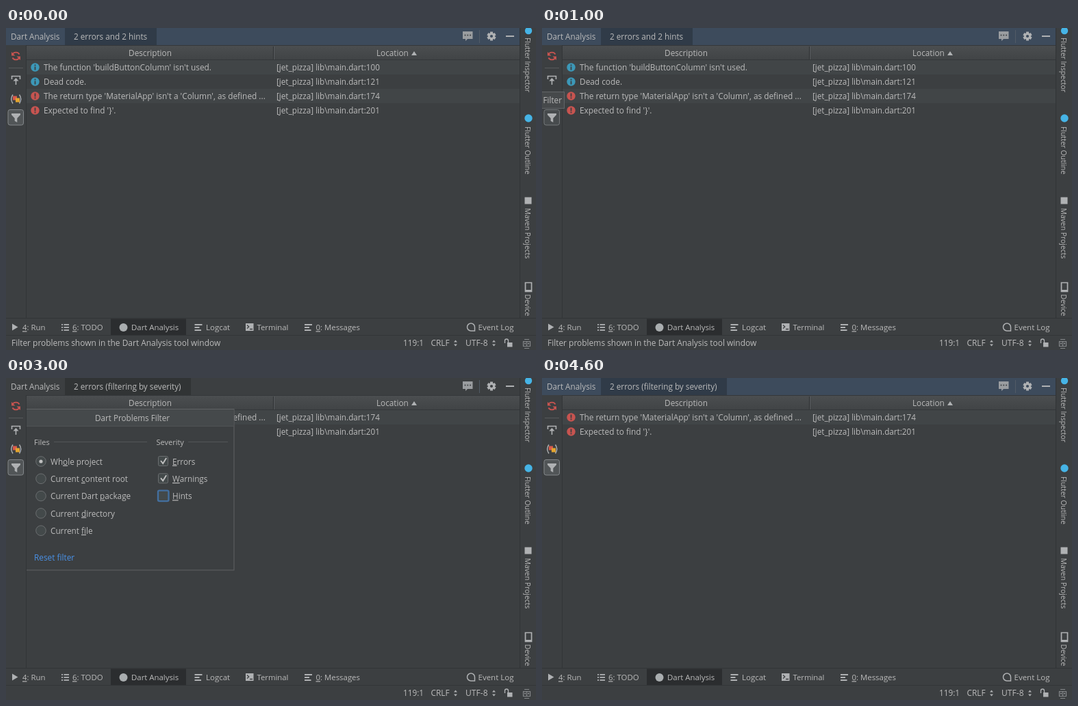
Animation of 774x471 px, one loop 5 s. Source, as an HTML page:

```html
<!DOCTYPE html>
<html lang="en">
<head>
<meta charset="utf-8">
<title>Analysis filter</title>
<style>
html, body { margin: 0; width: 100%; height: 100%; overflow: hidden; background: #3c3f41; }
svg { display: block; }
text { font-family: "Open Sans", "Noto Sans", sans-serif; fill: #bbbbbb; white-space: pre; }
.u { text-decoration: underline; }
.off { display: none; }
</style>
</head>
<body>
<svg id="stage" width="774" height="471" viewBox="0 0 774 471"></svg>
<script>
const STEP = 1000, STEPS = 5, GREY = '#afb1b3', RED = '#c75450';

// "&" marks the underlined mnemonic letter
const text = (x, y, s, size = 11.75, attrs = '') =>
  `<text x="${x}" y="${y}" font-size="${size}" ${attrs}>${s.replace(/&(.)/, '<tspan class="u">$1</tspan>')}</text>`;
const rect = (x, y, w, h, fill, attrs = '') =>
  `<rect x="${x}" y="${y}" width="${w}" height="${h}" fill="${fill}" ${attrs}/>`;
const line = (d, color = GREY, w = 1, attrs = '') =>
  `<path d="${d}" fill="none" stroke="${color}" stroke-width="${w}" ${attrs}/>`;
const shape = (d, fill = GREY) => `<path d="${d}" fill="${fill}"/>`;
const dot = (x, y, r, fill, attrs = '') => `<circle cx="${x}" cy="${y}" r="${r}" fill="${fill}" ${attrs}/>`;
const during = (steps, ...parts) => `<g data-on="${steps}">${parts.join('')}</g>`;
const sideText = (y, s) => text(0, 0, s, 10.4, `transform="translate(758 ${y}) rotate(90)"`);

const problems = [
  ['info', "The function 'buildButtonColumn' isn't used.", 100],
  ['info', 'Dead code.', 121],
  ['error', "The return type 'MaterialApp' isn't a 'Column', as defined ...", 174],
  ['error', "Expected to find '}'.", 201]
];

function badge(kind, y) {
  const error = kind === 'error';
  return dot(42.5, y, 6.2, error ? RED : '#3c98b8') +
    (error ? rect(41.6, y - 4, 1.8, 5, '#3c3f41') + rect(41.6, y + 2, 1.8, 1.9, '#3c3f41')
           : rect(41.6, y - 4, 1.8, 1.9, '#3c3f41') + rect(41.6, y - 1, 1.8, 5, '#3c3f41'));
}

const row = ([kind, message, at], i) => {
  const y = 57.5 + 21 * i;
  return (i % 2 ? '' : rect(30, y - 10.5, 720, 21, '#414547')) + badge(kind, y) +
    text(55, y + 4.5, message, 11.85) + text(395, y + 4.5, `[jet_pizza] lib\\main.dart:${at}`, 11.7);
};

const radio = (label, i) => {
  const y = 122 + 25.3 * i;
  return dot(51, y, 7.3, '#43494a', 'stroke="#6b6e70"') + (i ? '' : dot(51, y, 2.6, '#c0c0c0')) +
    text(65, y + 4.7, label);
};

const box = (label, i) => {
  const y = 122 + 25.3 * i, mark = line(`M226 ${y - 1}l3.2 4 5-8`, '#c0c0c0', 1.9);
  return rect(222.5, y - 7.5, 14, 14, '#43494a', 'rx="2" stroke="#6b6e70"') +
    (i < 2 ? mark : during('2', mark) +
      during('3', rect(222, y - 8, 15.5, 15.5, '#43494a', 'rx="2" stroke="#436f9f" stroke-width="2.4"'))) +
    text(243, y + 4.7, label);
};

const popup = () =>
  rect(29.5, 45.5, 303.5, 235.5, '#3c3f41', 'stroke="#606365"') +
  rect(30, 46, 302.5, 25, '#45494b') + line('M30 70.5H333', '#4f5254') +
  text(184.5, 63.3, 'Dart Problems Filter', 11.7, 'text-anchor="middle"') +
  text(41, 98, 'Files', 11) + line('M70 93.5H206', '#525557') +
  text(219.5, 98, 'Severity', 11) + line('M266 93.5H324', '#525557') +
  ['Whole project', 'Current &content root', 'Current Dart &package', 'Current &directory', 'Current &file']
    .map((s, i) => radio(i ? s : 'Wh&ole project', i)).join('') +
  ['&Errors', '&Warnings', '&Hints'].map(box).join('') +
  text(41, 267, 'Reset filter', 11.85, 'style="fill:#4a92e8"');

const gear = () => {
  let teeth = '';
  for (let a = 0; a < 360; a += 60) teeth += rect(707, 5.5, 4, 4, GREY, `transform="rotate(${a} 709 12)"`);
  return teeth + dot(709, 12, 3.6, 'none', `stroke="${GREY}" stroke-width="3"`);
};

const header = () =>
  during('014', rect(0, 0, 750, 25, '#3d4b5c')) +
  during('01', rect(86, 0, 134, 25, '#303b48')) +
  during('2', rect(86, 0, 134, 25, '#313435')) +
  during('3', rect(86, 0, 184, 25, '#313435')) +
  during('4', rect(86, 0, 184, 25, '#303b48')) +
  text(7, 17, 'Dart Analysis', 11.75) +
  during('012', text(99, 17, '2 errors and 2 hints', 11.75)) +
  during('34', text(99, 17, '2 errors (filtering by severity)', 11.75)) +
  shape('M667 5H681.500V16H674L671 19V16H667Z', '#9a9da0') +
  [670.5, 674.3, 678.1].map(x => dot(x, 10.5, 1, '#3c3f41')).join('') +
  line('M691.500 3V22', '#515b66') + gear() + rect(730, 11, 12, 2, GREY);

const table = () =>
  rect(30, 26, 720, 20.500, 'url(#head)') + line('M30 25.500H750M30 46.500H750', '#34373a') +
  line('M390.500 27V46', '#2c2e30') + line('M391.500 27V46', '#5a5d60') +
  text(210.5, 41, 'Description', 11.75, 'text-anchor="middle"') +
  text(541, 41, 'Location', 11.75) + shape('M592 40L596 34 600 40Z') +
  during('012', ...problems.map(row)) +
  during('34', ...problems.slice(2).map(row));

const funnel = shape('M8 125H21V127L16.300 132V138L12.700 136V132L8 127Z');

const tools = () =>
  line('M29.500 25V424', '#323537') +
  line('M19.500 38.500A5.500 5 0 0 0 9.500 38.500M9.500 43.500A5.500 5 0 0 0 19.500 43.500', RED, 1.8) +
  shape('M8 35V40.500H13.500ZM21 47V41.500H15.500Z', RED) +
  line('M4 58.500H25', '#57595b') +
  line('M8.500 75V70.500H20.500V75M14.500 83V75', GREY, 1.6) + shape('M10.500 77.500L14.500 73 18.500 77.500Z') +
  line('M10 97.500Q5.500 104 10 110.500M19.500 97.500Q24 104 19.500 110.500', GREY, 1.4) +
  rect(10, 99.5, 6, 6, '#d95b4c') + rect(14, 102.5, 6, 6, '#e3a52f') +
  during('034', rect(3, 119.5, 22.5, 22.5, '#515557', 'rx="3" stroke="#83878a"')) +
  during('1', rect(3, 119.5, 22.5, 22.5, '#474b4d', 'rx="3" stroke="#74787a"')) + funnel +
  during('1', rect(-1, 93.5, 33.5, 24, '#46494b', 'stroke="#626568"') + text(1.5, 110, 'Filter', 11.7));

const phone = line('M758.500 372.500H767.500V385.500H758.500Z', GREY, 1.7) + rect(758, 383, 10, 3, GREY);

const sidebar = () =>
  line('M750.500 0V424', '#313436') +
  dot(763, 4, 5.2, '#46b4e6') + sideText(14, 'Flutter Inspector') +
  dot(763, 132, 5.7, '#46b4e6') + sideText(144, 'Flutter Outline') +
  rect(757.5, 247.5, 10, 10, GREY) + sideText(263.5, 'Maven Projects') +
  phone + sideText(389.5, 'Device');

const bars = x => rect(x, 433, 11, 2, GREY) + rect(x, 437, 7, 2, GREY) + rect(x, 441, 9.5, 2, GREY);
const arrows = x => shape(`M${x} 459.500l2.500-3 2.500 3ZM${x} 462.500l2.500 3 2.500-3Z`);

const footer = () =>
  line('M0 424.500H774M0 449.500H774', '#323537') +
  rect(153, 425.5, 110, 23.5, '#2b2d2f') +
  shape('M9 432.500L17.500 437.500 9 442.500Z') + text(24, 442.3, '&4: Run', 11.4) +
  [433, 437, 441].map(y => rect(81, y, 2, 1.8, GREY) + rect(84.5, y, 7.5, 1.8, GREY)).join('') +
  text(97, 442.3, '&6: TODO', 11.4) +
  dot(171.5, 438, 6, '#a9adaf') + text(183, 442.3, 'Dart Analysis', 11.4) +
  bars(275.5) + text(292, 442.3, 'Logcat', 11.5) +
  rect(350, 432, 11.5, 11, GREY) + line('M352 434.500l2.700 2.500-2.700 2.500M356 440.500h4', '#3c3f41', 1.3) +
  text(366.5, 442.3, 'Terminal', 11.3) +
  bars(436) + text(452.5, 442.3, '&0: Messages', 11.4) +
  line('M679 443H684.500V437.500A5.500 5.500 0 1 0 679 443Z', GREY, 1.5) + text(689.5, 442.3, 'Event Log', 11.5) +
  during('01', text(8, 465.3, 'Filter problems shown in the Dart Analysis tool window', 11.95)) +
  text(580, 465.3, '119:1', 11.8) + text(620.5, 465.3, 'CRLF', 11.9) + arrows(654) +
  text(671, 465.3, 'UTF-8', 12.1) + arrows(710) +
  rect(732, 460, 7.5, 6.5, GREY) + line('M728.500 461V457.500A2.500 2.500 0 0 1 733.500 457.500V461', GREY, 1.4) +
  line('M757 455.500H764M755.500 458.500H765.500V465.500H755.500ZM757 468.500H764M760.500 459V465', '#85888a', 1.2) +
  rect(757, 460.5, 2, 2, '#85888a') + rect(762, 460.5, 2, 2, '#85888a');

stage.innerHTML =
  `<defs><linearGradient id="head" x2="0" y2="1"><stop stop-color="#4b4e50"/><stop offset="1" stop-color="#414446"/></linearGradient></defs>` +
  rect(0, 0, 774, 471, '#3c3f41') + header() + table() + during('23', popup()) + tools() + sidebar() + footer();

const timed = [...stage.querySelectorAll('[data-on]')];
let shown = -1;

function draw() {
  const step = Math.floor(performance.now() / STEP) % STEPS;
  if (step !== shown) {
    shown = step;
    timed.forEach(g => g.classList.toggle('off', !g.dataset.on.includes(step)));
  }
  requestAnimationFrame(draw);
}
draw();
</script>
</body>
</html>
```
